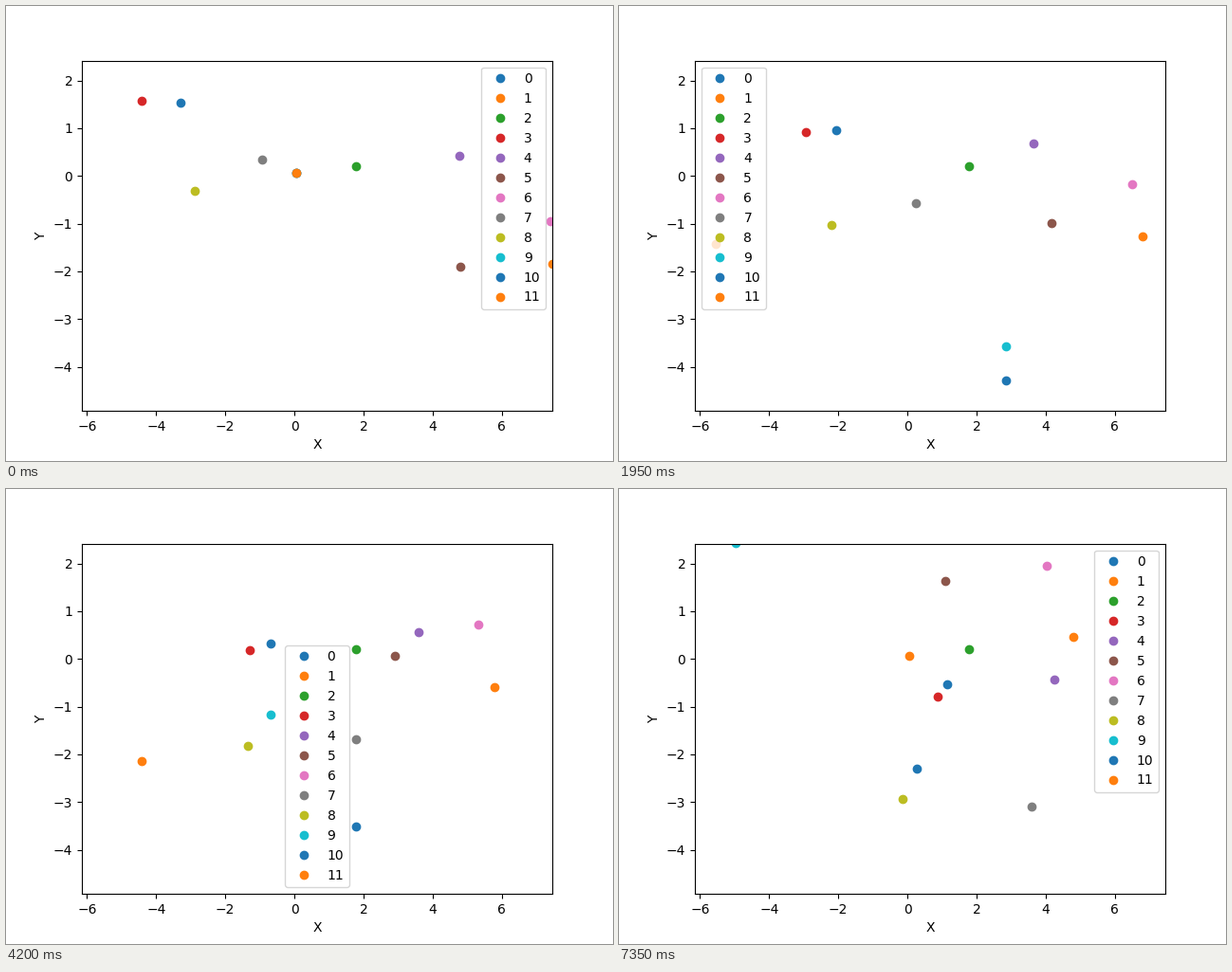
Animation of 640 by 480 pixels, one loop 7400 ms. Source, as a matplotlib script:

```python
import numpy as np
import matplotlib.pyplot as plt
from matplotlib.animation import FuncAnimation

STEP, FRAMES = 50, 148
LAST = STEP * (FRAMES - 1)
PARKED = (0.05, 0.07)  # where a walker waits while it is not tracked


def walk(*points, start=0, end=LAST):
    """Smooth curve through key points spaced evenly in time."""
    coef = np.polyfit(np.linspace(0, 1, len(points)), points, len(points) - 1)

    def at(now):
        if not start <= now <= end:
            return PARKED
        return np.polyval(coef, (now - start) / (end - start))

    return at


walkers = [
    walk((-3.30, 1.54), (-0.99, 0.47), (1.14, -0.53)),
    walk((7.46, -1.84), (6.58, -1.12), (5.50, -0.36), (4.80, 0.47)),
    walk((1.79, 0.20)),
    walk((-4.43, 1.58), (-1.67, 0.35), (0.87, -0.79)),
    walk((4.77, 0.43), (3.56, 0.69), (3.73, 0.42), (4.25, -0.43)),
    walk((4.80, -1.90), (3.92, -0.76), (2.46, 0.40), (1.09, 1.64)),
    walk((7.41, -0.94), (6.25, 0.03), (4.99, 1.00), (4.03, 1.96)),
    walk((-0.94, 0.35), (0.59, -0.82), (2.26, -2.03), (3.59, -3.09)),
    walk((-2.89, -0.31), (-1.55, -1.64), (-0.15, -2.93)),
    walk((5.24, -4.92), (1.57, -2.75), (-1.95, -0.19), (-4.98, 2.42),
         start=450),
    walk((3.53, -4.71), (1.88, -3.60), (0.27, -2.29), start=600),
    walk((-6.15, -1.06), (-4.48, -2.10), (-3.03, -3.11),
         start=850, end=LAST - STEP),
]

fig, ax = plt.subplots(figsize=(6.4, 4.8), dpi=100)
ax.set(xlim=(-6.148, 7.465), ylim=(-4.924, 2.416), xlabel="X", ylabel="Y")
dots = [ax.plot(*at(0), "o", label=str(i))[0] for i, at in enumerate(walkers)]
ax.legend(loc="best")  # moves to the emptiest spot on every draw


def update(i):
    for dot, at in zip(dots, walkers):
        x, y = at(i * STEP)
        dot.set_data([x], [y])
    return dots


anim = FuncAnimation(fig, update, frames=FRAMES, interval=STEP,
                     repeat=True, repeat_delay=0, blit=False)
plt.show()
```
